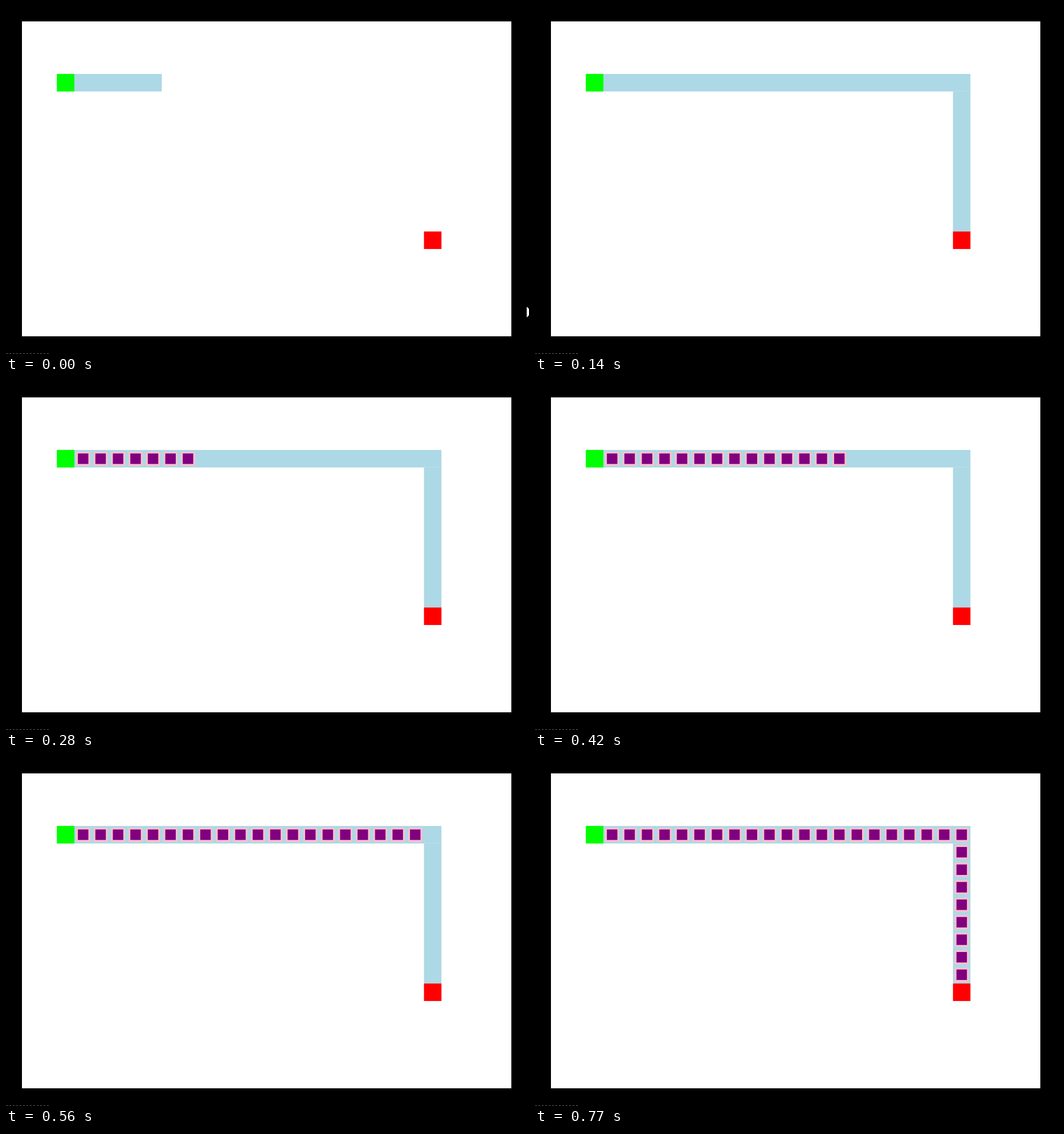
Recreate the animation shown at these times as an HTML page with a canvas. Size 918 by 610 pixels, loop 0.97 s.

```html
<!DOCTYPE html>
<html lang="en">
<head>
<meta charset="utf-8">
<title>Path search</title>
<style>
  html, body { margin: 0; width: 100%; height: 100%; overflow: hidden; background: #000; }
  canvas { display: block; }
</style>
</head>
<body>
<canvas id="stage" width="918" height="610"></canvas>
<script>
const ctx = document.getElementById('stage').getContext('2d');
const LOOP = 970, STEP = 70;
const CELL = 30.68, LEFT = 28, TOP = 27.1;
const START = { col: 2, row: 3 }, GOAL = { col: 23, row: 12 };
const ACROSS = GOAL.col - START.col;
const LENGTH = ACROSS + GOAL.row - START.row - 1;

function rect(color, x, y, w, h) {
  ctx.fillStyle = color;
  ctx.fillRect(x, y, w, h);
}

function cells(color, col, row, cols = 1, rows = 1) {
  rect(color, LEFT + col * CELL, TOP + row * CELL, cols * CELL, rows * CELL);
}

function marker(i) {
  const x = LEFT + (START.col + Math.min(i, ACROSS) + 0.5) * CELL;
  const y = TOP + (START.row + Math.max(i - ACROSS, 0) + 0.5) * CELL;
  for (const [color, scale] of [['#ffc0cb', 0.8], ['#800080', 0.6]]) {
    const size = CELL * scale;
    rect(color, x - size / 2, y - size / 2, size, size);
  }
}

function drawBoard() {
  rect('#000', 0, 0, 918, 610);
  rect('#fff', 28, 27, 859, 552);
  // Sliver of the window below
  rect('#555', 0, 609, 4, 1);
  for (let x = 6; x < 78; x += 6) rect('#666', x, 609, 3, 1);
}

function drawPointer() {
  ctx.fillStyle = '#fff';
  ctx.beginPath();
  ctx.moveTo(914, 527);
  ctx.lineTo(918, 531);
  ctx.lineTo(918, 542);
  ctx.lineTo(914, 546);
  ctx.fill();
}

function draw(now) {
  const step = Math.floor((now % LOOP) / STEP);
  const visited = [5, 18][step] ?? LENGTH;
  const marked = step < 3 ? 0 : Math.min(LENGTH, Math.floor(7.9 + 3.1 * (step - 4)));

  drawBoard();
  cells('#add8e6', START.col, START.row, Math.min(visited, ACROSS) + 1);
  if (visited > ACROSS) cells('#add8e6', GOAL.col, START.row + 1, 1, visited - ACROSS);
  for (let i = 1; i <= marked; i++) marker(i);
  cells('#0f0', START.col, START.row);
  cells('#f00', GOAL.col, GOAL.row);
  if (step === 0) drawPointer();
}

function tick() {
  draw(performance.now());
  requestAnimationFrame(tick);
}
tick();
</script>
</body>
</html>
```
